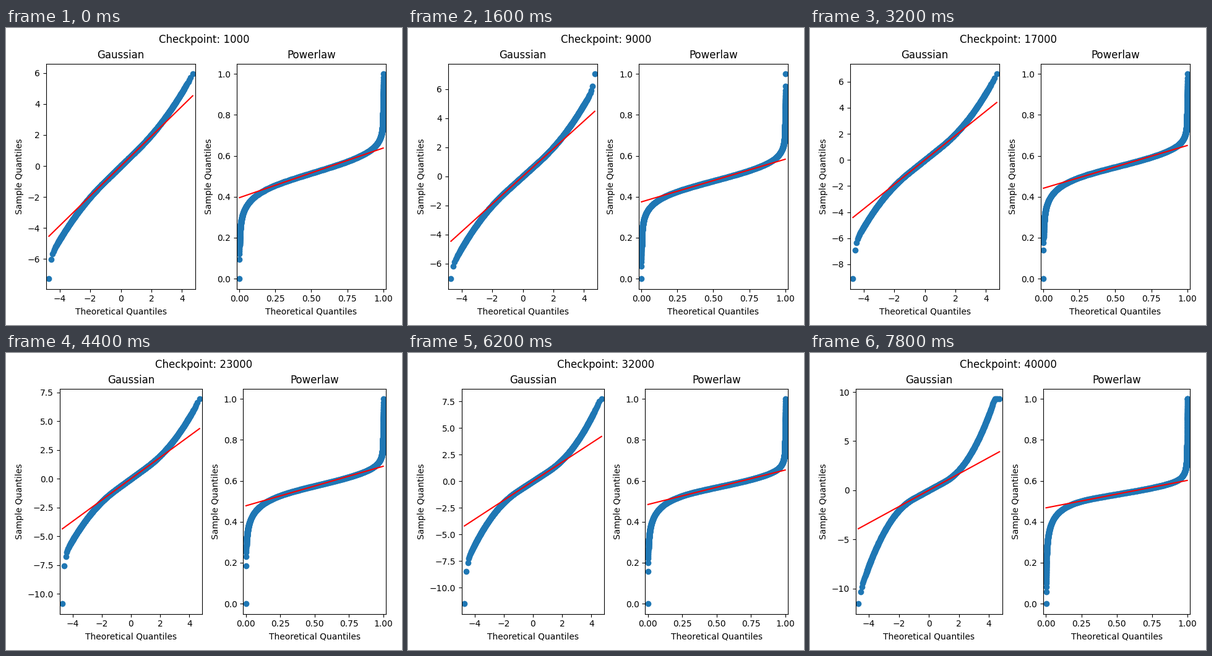
Recreate the animation shown at these times as a matplotlib script. Size 640 by 480 pixels, loop 8 s.

```python
import math

import matplotlib.pyplot as plt
import numpy as np
from matplotlib.animation import FuncAnimation

FRAMES = 40
N = 768000
Q75 = 0.67449

# Smallest and largest sample values at a few checkpoints.
STEPS = [0, 8, 16, 22, 28, 35, 39]
LOWEST = [-7.28, -7.05, -9.1, -10.85, -11.5, -11.55, -11.55]
HIGHEST = [5.95, 7.05, 6.6, 6.93, 7.1, 8.6, 9.3]


def norm_cdf(q):
    return np.array([0.5 * math.erfc(-v / math.sqrt(2)) for v in q])


# Exact order statistics in the tails, an even grid in between.
grid = np.linspace(3.5, 5, 1500)
ranks = np.arange(1, 41) / (N + 1)
tail = np.interp(-np.log(ranks), -np.log(norm_cdf(-grid)), grid)
q = np.concatenate([-tail, np.linspace(-tail[-1], tail[-1], 800), tail[::-1]])
prob = norm_cdf(q)


def shape(i):
    """Central slope and tail weight; both drift, then change fast late on."""
    late = (i / (FRAMES - 1)) ** 6
    return 0.965 - 0.0017 * i - 0.065 * late, 0.9 + 0.03 * i + 2.3 * late


def magnitude(m, slope, weight, extreme):
    """Size of the sample quantile at distance m from the median."""
    def law(d):
        return slope * d + weight * (np.maximum(d - 1, 0) / 3) ** 2.2

    # The last few order statistics bend towards the extreme value.
    end = tail[0]
    pull = (np.maximum(m - 4, 0) / (end - 4)) ** 6
    return np.minimum(law(m) + (extreme - law(end)) * pull, extreme)


def sample(i):
    slope, weight = shape(i)
    low = np.interp(i, STEPS, LOWEST)
    high = np.interp(i, STEPS, HIGHEST)
    m = np.abs(q)
    return np.where(q < 0, -magnitude(m, slope, weight, -low),
                    magnitude(m, slope, weight, high))


fig, axes = plt.subplots(1, 2, figsize=(6.4, 4.8), dpi=100)
title = fig.suptitle("Checkpoint: 1000")
plots = []
for ax, name in zip(axes, ("Gaussian", "Powerlaw")):
    ax.set_xmargin(0.02)
    ax.set_title(name)
    ax.set_xlabel("Theoretical Quantiles")
    ax.set_ylabel("Sample Quantiles")
    dots, = ax.plot([], [], "o", color="C0")
    fit, = ax.plot([], [], "r-")
    plots.append((ax, dots, fit))


def show(plot, x, y, qx, qy):
    """Draw the points and the line through their quartiles."""
    ax, dots, fit = plot
    dots.set_data(x, y)
    ends = np.array([x[0], x[-1]])
    slope = (qy[1] - qy[0]) / (qx[1] - qx[0])
    fit.set_data(ends, qy[0] + slope * (ends - qx[0]))
    ax.relim()
    ax.autoscale_view()


def update(i):
    title.set_text(f"Checkpoint: {1000 * (i + 1)}")
    z = sample(i)
    quart = np.array([-Q75, Q75])
    zq = quart * shape(i)[0]
    show(plots[0], q, z, quart, zq)

    # Rescale to 0..1 and use the best-fitting power-law exponent.
    span = z[-1] - z[0]
    a = -1 / (math.log(-z[0] / span) - 0.5 / span ** 2)
    show(plots[1], prob ** (1 / a), (z - z[0]) / span,
         np.array([0.25, 0.75]) ** (1 / a), (zq - z[0]) / span)
    fig.tight_layout()
    fig.subplots_adjust(top=0.88)
    return ()


anim = FuncAnimation(fig, update, frames=FRAMES, interval=200,
                     repeat=True, repeat_delay=0, blit=False)
plt.show()
```
